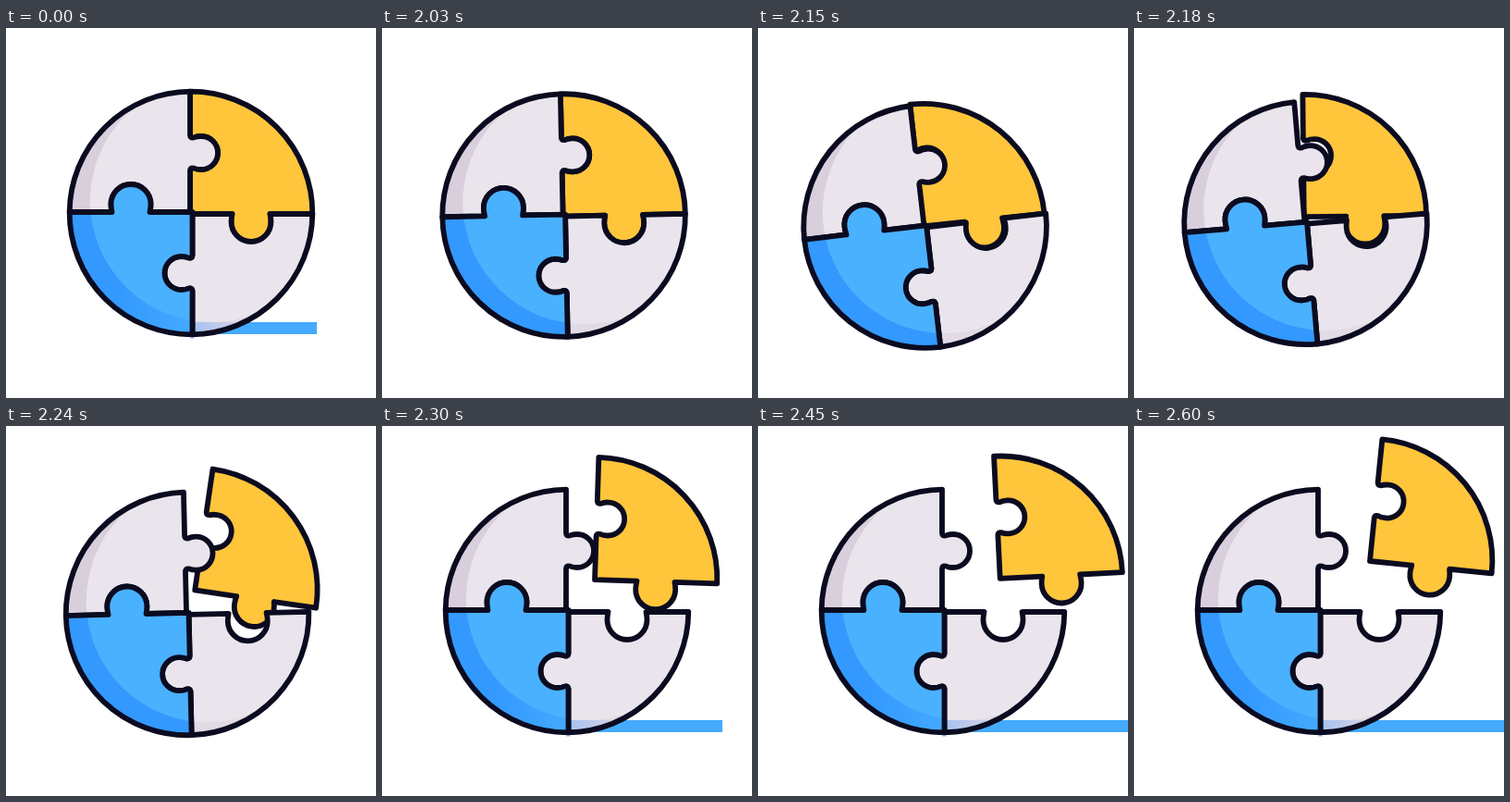
Animation of 400x400 px, one loop 2660 ms. Source, as an HTML page:

```html
<!DOCTYPE html>
<html lang="en">
<head>
<meta charset="utf-8">
<title>Puzzle disc</title>
<style>
  html, body { margin: 0; width: 100%; height: 100%; overflow: hidden; background: #fff; }
  svg { display: block; width: 100vw; height: 100vh; }
</style>
</head>
<body>
<svg viewBox="0 0 400 400">
  <defs>
    <linearGradient id="tint">
      <stop offset="0" stop-color="#a9c3f2"/>
      <stop offset="1" stop-color="#d3d1e6"/>
    </linearGradient>
    <linearGradient id="fade" gradientUnits="userSpaceOnUse" x1="120" y1="0" x2="202" y2="0">
      <stop offset="0" stop-color="#4ab1ff" stop-opacity="0"/>
      <stop offset="1" stop-color="#4ab1ff" stop-opacity=".7"/>
    </linearGradient>
  </defs>
  <g id="strip">
    <rect id="bar" x="204" y="318" height="13" fill="#45abff"/>
    <rect x="199" y="331" width="5" height="5" fill="#bfe0ff"/>
  </g>
  <g id="loose"></g>
  <g id="disc"></g>
</svg>
<script>
const $ = id => document.getElementById(id);
const LOOP = 2660, START = 2030, STEP = 30, LAST = 20;
const ARC = 'A131.4 131.4 0 0 1 ';
// Everything outside the lit circle is in shade
const SHADE = 'M0 0H400V400H0ZM91 187a131 131 0 0 0 262 0a131 131 0 0 0 -262 0Z';

// Half a tab from its foot to its round head: [along the seam, away from it]
const NARROW = [[19, 0], [16, .5], [16.5, 4], [18, 7], [18, 12]];
const WIDE = [[20.5, 0], [21.5, 5], [21.5, 8.5]];

// Returns the tab's outline, walked forwards (dir 1) or backwards (dir -1)
function seam(half, clockwise, place) {
  return dir => {
    const side = s => half.map(([u, v]) => place(s * u, v));
    const up = side(-dir), down = side(dir).reverse();
    const r = half[half.length - 1][0];
    const sweep = +(clockwise === (dir > 0));
    return `L${up[0]}Q${up.slice(1)}A${r} ${r} 0 0 ${sweep} ${down[0]}Q${down.slice(1)}`;
  };
}
const top_ = seam(NARROW, true, (u, v) => [199 + v, 135 + u]);
const left = seam(WIDE, true, (u, v) => [135 + u, 199 - v]);
const low = seam(NARROW, false, (u, v) => [201.5 - v, 265 + u]);
const right = seam(WIDE, false, (u, v) => [265 + u, 201 + v]);

const pieces = {
  grayTop: { fill: '#eae5ec', shade: '#d9cfdc',
    d: `M199 68.7${top_(1)}L199 199${left(-1)}L68.7 199${ARC}199 68.7Z` },
  grayLow: { fill: '#eae5ec', shade: '#e2dae4',
    d: `M201.5 201${right(1)}L331.3 201${ARC}201.5 331.3${low(-1)}Z`,
    glow: '<rect class="rest" x="204" y="318" width="48" height="13" fill="url(#tint)"/>' },
  blue: { fill: '#4ab1ff', shade: '#3399ff',
    d: `M68.7 199${left(1)}L201.5 199${low(1)}L201.5 331.3${ARC}68.7 199Z`,
    glow: `<path class="rest" d="${SHADE}" fill-rule="evenodd" fill="url(#fade)"/>` },
  yellow: { fill: '#ffc53b', shade: 'none',
    d: `M199 68.7${ARC}331.3 201${right(-1)}L199 201${top_(-1)}Z` }
};

function markup(id) {
  const { d, fill, shade, glow = '' } = pieces[id];
  return `<path d="${d}" fill="${fill}"/>
    <clipPath id="${id}"><path d="${d}"/></clipPath>
    <g clip-path="url(#${id})"><path d="${SHADE}" fill-rule="evenodd" fill="${shade}"/>${glow}</g>
    <path d="${d}" fill="none" stroke="#0b0b20" stroke-width="5.8" stroke-linejoin="round"/>`;
}
$('disc').innerHTML = ['grayTop', 'grayLow', 'blue'].map(markup).join('');
$('loose').innerHTML = markup('yellow');
const rests = document.querySelectorAll('.rest');

const ease = u => (1 - Math.cos(Math.PI * Math.min(1, Math.max(0, u)))) / 2;

// Swings softly from one turning point [step, value] to the next
function swing(n, points) {
  let value = points[0][1];
  for (let i = 1; i < points.length; i++) {
    const [a, from] = points[i - 1], [b, to] = points[i];
    value += (to - from) * ease((n - a) / (b - a));
  }
  return value;
}

// Disc: 0 upright, 1 furthest down and left
const lean = n => Math.min(ease(n / 4), 1 - ease((n - 3.25) / 6.5));

// Yellow piece once free: its inner corner and angle
const RELEASE = 5, PEAK = 14.3;
const flyX = n => swing(n, [[4, 176], [PEAK, 262], [LAST, 255]]);
const flyY = n => swing(n, [[4, 218], [9.8, 166], [12.3, 172], [LAST, 146]]);
const turn = n => swing(n, [[4, -8], [8.3, 8.6], [12, -6.8], [LAST, 5.8]]);

function draw(t) {
  const n = t < START ? 0 : Math.min(LAST, 1 + Math.floor((t - START) / STEP));
  const p = lean(n), free = n >= RELEASE;
  const pose = `translate(${-23.3 * p} ${17.5 * p}) rotate(${-8 * p} 200 200)`;
  $('disc').setAttribute('transform', pose);
  $('loose').setAttribute('transform', free
    ? `translate(${flyX(n)} ${flyY(n)}) rotate(${turn(n)}) translate(-199 -201)` : pose);

  // The strip reaches as far as the yellow piece has been
  const show = p > 0 ? 'none' : 'inline';
  $('strip').style.display = show;
  rests.forEach(r => r.style.display = show);
  $('bar').setAttribute('width', (free ? flyX(Math.min(n, PEAK)) : 198) + 138 - 204);
}

function tick() {
  draw(performance.now() % LOOP);
  requestAnimationFrame(tick);
}
tick();
</script>
</body>
</html>
```
